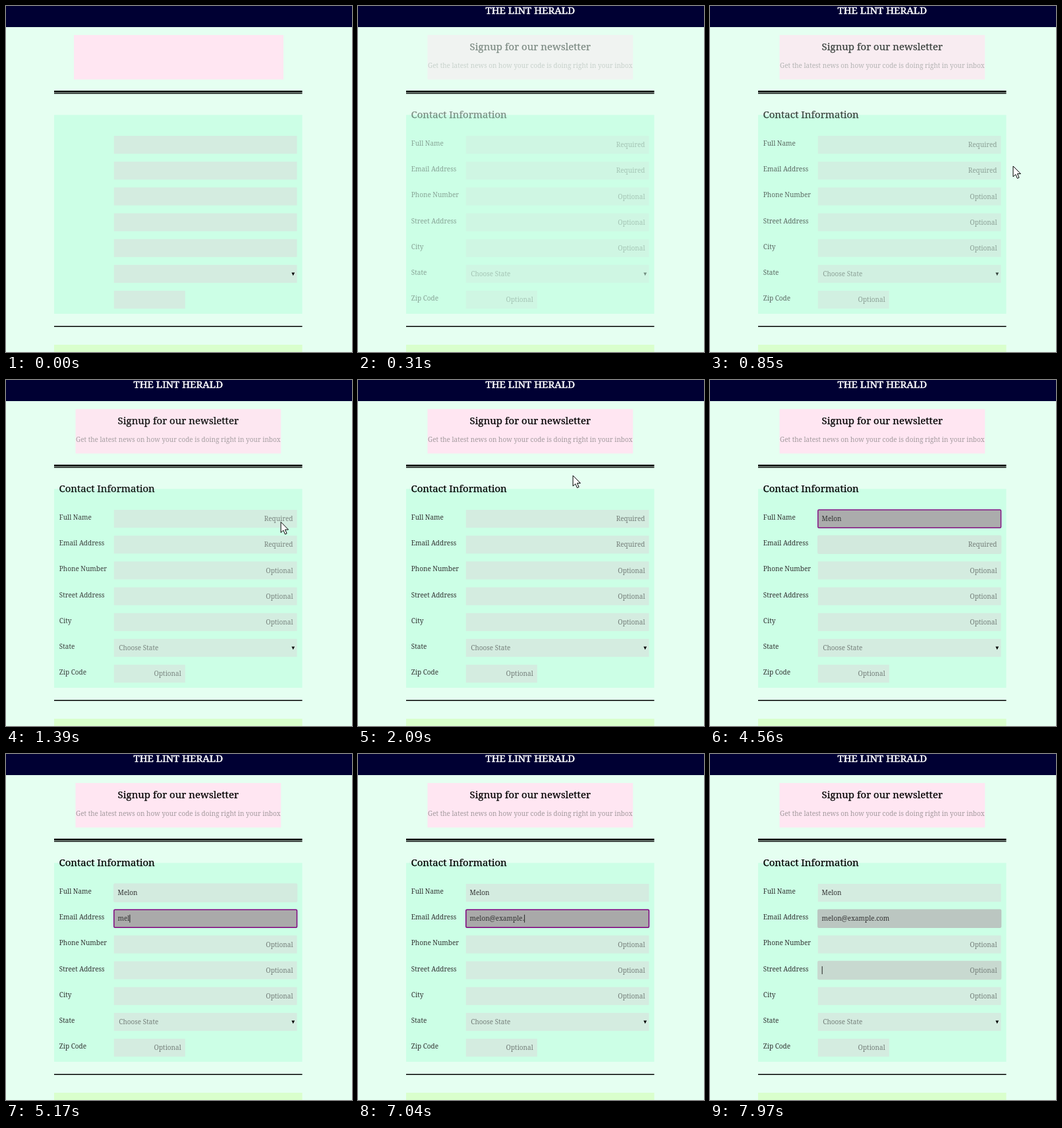
Animation, 525 px wide and 525 px high, one loop 8 s. Source, as an HTML page:

```html
<!DOCTYPE html>
<html lang="en">
<head>
<meta charset="utf-8">
<title>Newsletter form</title>
<style>
  html, body { margin: 0; width: 100%; height: 100%; overflow: hidden; background: #e5fff1; }
  svg { display: block; width: 100%; height: 100%; }
  text { font: 10px "Noto Serif", serif; fill: #333; white-space: pre; }
  .heading { font-size: 15px; fill: #000; stroke: #000; stroke-width: .25; }
  .title { fill: #fff; stroke: #fff; stroke-width: .5; }
  .hint { fill: #757f7a; }
  .middle { text-anchor: middle; }
  .end { text-anchor: end; }
</style>
</head>
<body>
<svg id="stage" viewBox="0 0 525 525">
  <rect width="525" height="32" fill="#000033"/>
  <text id="title" class="heading title middle" x="261.3" y="12.3">THE LINT HERALD</text>
  <rect x="73" y="165.3" width="376.5" height="301.7" fill="#ccffe6"/>
  <path d="M73 129.9h376.5" stroke="#000" stroke-width="2.8"/>
  <path d="M73 132.6h376.5" stroke="#000" stroke-width="1.2"/>
  <path d="M73 486.2h376.5" stroke="#000" stroke-width="1.5"/>
  <rect x="73" y="514" width="376.5" height="11" fill="#d9ffcc"/>
  <g id="content">
    <rect id="banner" y="44" height="67.5" fill="#ffe6f2"/>
    <g id="fields"></g>
    <path d="M433.3 404.4h4.8l-2.4 4.8z"/>
    <g id="copy">
      <text class="heading middle" x="261.3" y="67">Signup for our newsletter</text>
      <text class="middle" x="261.3" y="94" style="fill:#a39a9e">Get the latest news on how your code is doing right in your inbox</text>
      <text class="heading" x="80.5" y="170">Contact Information</text>
    </g>
  </g>
  <path id="caret" d="M0 0v12" stroke="#222" stroke-width="1"/>
  <path id="pointer" d="M0 0V16L3.8 12.6L6.4 18.6L9 17.4L6.4 11.6H11.4Z" fill="#fff" stroke="#000" stroke-width="1" stroke-linejoin="round"/>
</svg>
<script>
const LOOP = 8000, TEXT_AT = 80, FADE_END = 1690, FOCUS_MS = 800;
const FIELD = [212, 236, 224], FOCUSED = [169, 169, 169], PURPLE = [128, 0, 128];

// Focus intervals and the time at which each character is typed.
const rows = [
  { label: 'Full Name', hint: 'Required', focus: [2450, 4440],
    value: 'Melon', keys: [3470, 3780, 3930, 4100, 4170] },
  { label: 'Email Address', hint: 'Required', focus: [4440, 7600],
    value: 'melon@example.com',
    keys: [4860, 5010, 5090, 5250, 5330, 5630, 5880, 6110, 6410, 6580, 6660,
           6890, 6960, 7040, 7210, 7360, 7360] },
  { label: 'Phone Number', hint: 'Optional' },
  { label: 'Street Address', hint: 'Optional', focus: [7670, 9000] },
  { label: 'City', hint: 'Optional' },
  { label: 'State', choice: 'Choose State' },
  { label: 'Zip Code', hint: 'Optional', width: 108 },
];

// Pointer path: time, x, y
const pointerPath = [
  [460, 502, 264], [850, 460, 243], [1230, 453, 239], [1310, 448, 234],
  [1690, 303, 147], [1860, 302, 147], [1930, 302, 147], [2010, 308, 147],
  [2090, 326, 145], [2240, 349, 140], [2400, 349, 140], [2700, 501, 113],
];

const $ = id => document.getElementById(id);
const clamp = v => Math.min(1, Math.max(0, v));
const easeInOut = u => u < .5 ? 2 * u * u : 1 - 2 * (1 - u) ** 2;
const mix = (a, b, k) => a.map((v, i) => v + (b[i] - v) * k);
const rgb = c => `rgb(${c.map(Math.round)})`;
const show = (node, on) => node.setAttribute('visibility', on ? 'visible' : 'hidden');

function add(parent, tag, attrs, text = '') {
  const node = document.createElementNS('http://www.w3.org/2000/svg', tag);
  for (const name in attrs) node.setAttribute(name, attrs[name]);
  node.textContent = text;
  return parent.appendChild(node);
}

rows.forEach((row, i) => {
  const y = row.y = 197 + 39.17 * i, width = row.width || 277.7;
  row.box = add($('fields'), 'rect', { x: 163.8, y, width, height: 27.2, fill: rgb(FIELD) });
  add($('copy'), 'text', { x: 80.8, y: y + 15 }, row.label);
  if (row.choice) add($('copy'), 'text', { x: 171.3, y: y + 17.3, class: 'hint' }, row.choice);
  if (row.hint) row.hintNode = add($('copy'), 'text',
    { x: 163.8 + width - 6, y: y + 17.3, class: 'hint end' }, row.hint);
  if (row.keys) row.text = add($('copy'), 'text', { x: 169.5, y: y + 17.3 });
});

function drawRow(row, t) {
  const [start, stop] = row.focus;
  const level = easeInOut(clamp((t - start) / FOCUS_MS)) - easeInOut(clamp((t - stop) / FOCUS_MS));
  const fill = mix(FIELD, FOCUSED, level);
  row.box.setAttribute('fill', rgb(fill));
  row.box.setAttribute('stroke', level > 0 ? rgb(mix(fill, PURPLE, clamp((level - .6) / .4))) : 'none');
  row.box.setAttribute('stroke-width', 1.5);
  row.box.setAttribute('rx', level > 0 ? 1.5 : 0);

  const typed = row.keys ? row.keys.filter(k => t >= k).length : 0;
  if (row.text) {
    row.text.textContent = row.value.slice(0, typed);
    show(row.hintNode, !typed);
  }
  if (t >= start && t < stop && (typed || !row.keys)) {
    const x = 170.2 + (typed ? row.text.getComputedTextLength() - .2 : 0);
    $('caret').setAttribute('transform', `translate(${x} ${row.y + 7.6})`);
    show($('caret'), true);
  }
}

function drawPointer(t) {
  const next = pointerPath.findIndex(p => p[0] > t);
  show($('pointer'), next > 0);
  if (next < 1) return;
  const a = pointerPath[next - 1], b = pointerPath[next];
  const [, x, y] = mix(a, b, (t - a[0]) / (b[0] - a[0]));
  $('pointer').setAttribute('transform', `translate(${x} ${y})`);
}

function draw(t) {
  const loaded = t >= TEXT_AT;
  const fade = 1 - (1 - clamp((t - TEXT_AT) / (FADE_END - TEXT_AT))) ** 1.5;
  $('content').setAttribute('opacity', loaded ? .3 + .7 * fade : 1);
  $('copy').setAttribute('display', loaded ? 'inline' : 'none');
  show($('title'), loaded);
  $('banner').setAttribute('x', loaded ? 105.5 : 103);
  $('banner').setAttribute('width', loaded ? 311.7 : 318);
  show($('caret'), false);
  rows.filter(row => row.focus).forEach(row => drawRow(row, t));
  drawPointer(t);
}

function tick() {
  draw(performance.now() % LOOP);
  requestAnimationFrame(tick);
}
tick();
</script>
</body>
</html>
```
